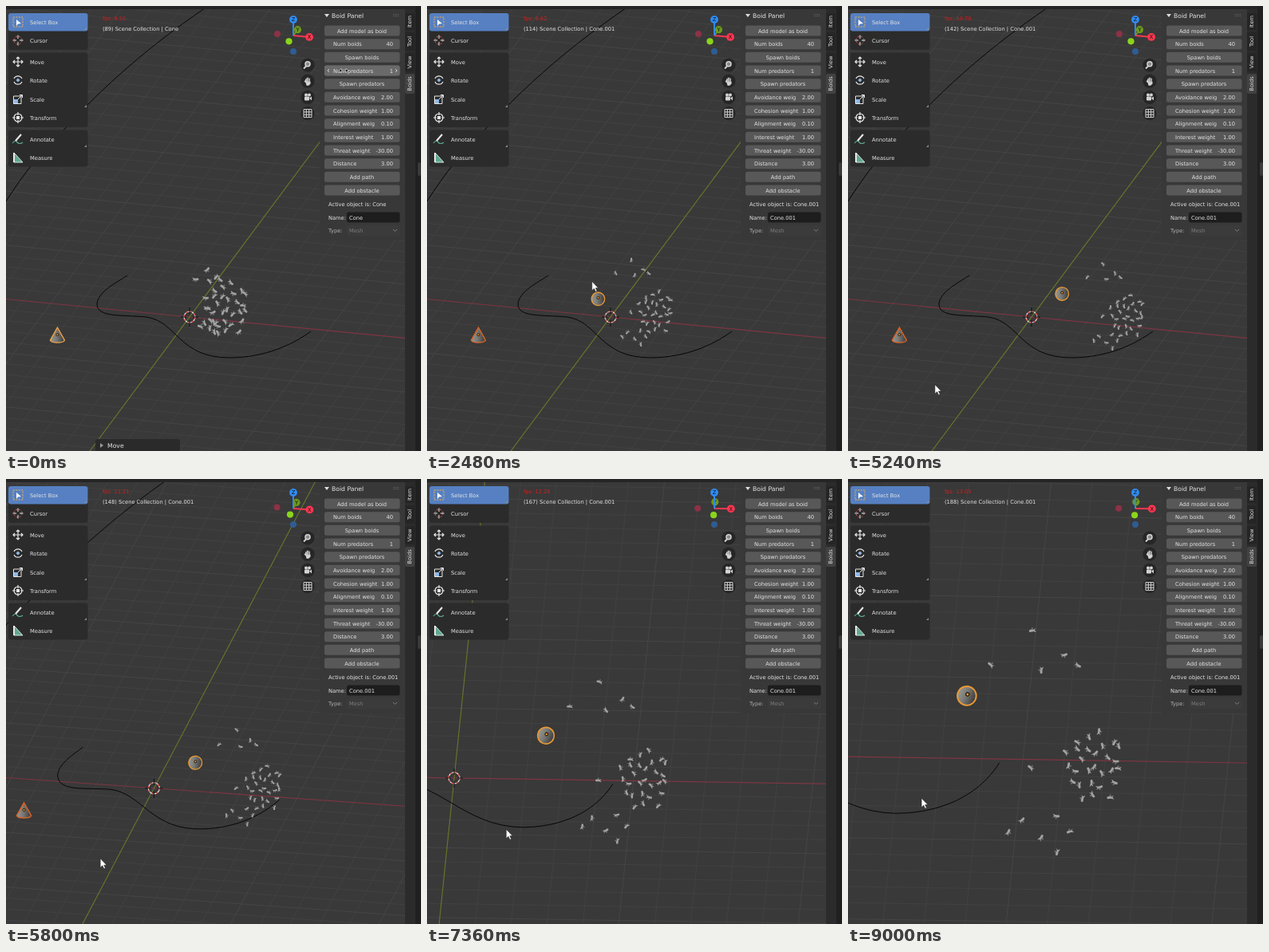
Animation, 520 px wide and 558 px high, one loop 9.04 s. Source, as an HTML page:

```html
<!DOCTYPE html>
<html>
<head>
<meta charset="utf-8">
<style>
html, body { margin: 0; width: 100%; height: 100%; overflow: hidden; background: #393939; }
svg { display: block; width: 520px; height: 558px; }
text { font-family: "DejaVu Sans", sans-serif; font-size: 6.7px; fill: #e4e4e4; }
.ground path { vector-effect: non-scaling-stroke; fill: none; }
</style>
</head>
<body>
<svg id="stage" viewBox="0 0 520 558"></svg>
<script>
const LOOP = 9040, SPAWN = 1400;
const stage = document.getElementById('stage');

function add(parent, tag, attrs = {}, content) {
  const node = document.createElementNS('http://www.w3.org/2000/svg', tag);
  set(node, attrs);
  if (content !== undefined) node.textContent = content;
  return parent.appendChild(node);
}
function set(node, attrs) {
  for (const key in attrs) node.setAttribute(key, attrs[key]);
}
const group = (parent, attrs) => add(parent, 'g', attrs);
const rect = (parent, x, y, width, height, fill, rx = 0) => add(parent, 'rect', { x, y, width, height, fill, rx });
const path = (parent, d, stroke, width = 1, fill = 'none') =>
  add(parent, 'path', { d, stroke, 'stroke-width': width, fill });
const shape = (parent, d, fill) => add(parent, 'path', { d, fill });
const disc = (parent, cx, cy, r, fill) => add(parent, 'circle', { cx, cy, r, fill });
const label = (parent, x, y, content, attrs = {}) => add(parent, 'text', { x, y, ...attrs }, content);
const show = (node, on) => node.setAttribute('display', on ? 'inline' : 'none');
const move = (node, x, y, rest = '') => node.setAttribute('transform', `translate(${x} ${y}) ${rest}`);
const ramp = (t, from, to) => Math.min(1, Math.max(0, (t - from) / (to - from)));

// Straight travel between a few timed stops
function sample(stops, t) {
  const i = Math.max(1, stops.findIndex(([time]) => time > t));
  const a = stops[i - 1], b = stops[i];
  const p = ramp(t, a[0], b[0]);
  return [1, 2].map(n => a[n] + (b[n] - a[n]) * p);
}
const POINTER = [
  [0, 423, 81], [500, 445, 97], [1400, 445, 97], [2480, 207, 345], [3000, 60, 515], [3800, 99, 481],
  [5400, 110, 474], [6480, 132, 479], [8120, 71, 405], [LOOP, 93, 400]
];
// time, frame count, frames per second
const COUNTER = [[0, 89, 9.5], [2480, 114, 9.62], [5240, 142, 10.7], [6480, 156, 11.83], [LOOP, 189.4, 13.07]];

// The camera first orbits, then zooms in, then pans
const phases = t => [ramp(t, 5480, 6480), ramp(t, 6480, 8120), ramp(t, 8120, 9000)];
function camera(t) {
  const [orbit, zoomIn, pan] = phases(t);
  const yaw = (15.1 - 12.8 * orbit) * Math.PI / 180;
  return {
    x: 230 - 139 * orbit - 106 * zoomIn - 23 * pan,
    y: 390 - 7 * orbit - 15 * zoomIn - 20.5 * pan,
    zoom: 1 + .04 * orbit + .39 * zoomIn,
    tilt: .363 + .02 * orbit + .012 * zoomIn,
    c: Math.cos(yaw), s: Math.sin(yaw)
  };
}
const groundMatrix = ({ x, y, zoom, tilt, c, s }) =>
  new DOMMatrix([zoom * c, zoom * tilt * s, zoom * s, -zoom * tilt * c, x, y]);
const wallMatrix = ({ x, y, zoom, tilt, c, s }) =>
  new DOMMatrix([zoom * c, zoom * tilt * s, 0, -.93 * zoom, x - 60 * zoom * s, y + 60 * zoom * tilt * c]);

// Ground, axes and paths
rect(stage, 0, 0, 520, 558, '#393939');
const ground = group(stage, { class: 'ground' });
let fine = '', bold = '';
for (let i = -45; i <= 45; i++) {
  const v = i * 36, lines = `M${v} -1800V1800M-1800 ${v}H1800`;
  if (i % 5) fine += lines; else if (i) bold += lines;
}
path(ground, fine, '#414141');
path(ground, bold, '#454545');
path(ground, 'M-1800 0H1800', '#7e3543', 1.1);
path(ground, 'M0 -1800V1800', '#69772b', 1.1);

const track = group(stage, { class: 'ground' });
path(track, 'M152 338C138 347 116 358 114 373C113 391 145 387 176 390C215 396 216 441 280 441C325 441 360 424 382 408', '#060606');
const arch = group(stage, { class: 'ground' });
path(arch, 'M-290 30C-268 80 -246 120 -222 156C-199 196 -175 230 -147 260C-95 325 -35 385 34 441L110 490', '#060606');

// 3D cursor
const ring = r => `M${r} 0A${r} ${r} 0 1 1 -${r} 0A${r} ${r} 0 1 1 ${r} 0`;
const origin = group(stage);
path(origin, ring(7), '#e8e8e8', 1.2);
set(path(origin, ring(7), '#e03434', 1.2), { 'stroke-dasharray': '2.75 2.75' });
path(origin, 'M-11 0H-4M4 0H11M0 -12V-4M0 4V12', '#111');

// Cones
const shade = add(add(stage, 'defs'), 'linearGradient', { id: 'shade' });
['#989894', '#777773', '#444444'].forEach((color, i) => add(shade, 'stop', { offset: i * .45, 'stop-color': color }));
const cone = group(stage);
const coneBody = path(cone, 'M0 -9L9 7Q8 10 0 10Q-8 10 -9 7Z', '#e8a24a', 1.4, 'url(#shade)');
const hunter = group(stage);
set(disc(hunter, 0, 0, 8.3, 'url(#shade)'), { stroke: '#ec9a33', 'stroke-width': 1.3 });
for (const [body, y] of [[cone, 0], [hunter, -1.5]]) {
  disc(body, 0, y, 1.9, '#2b1c10');
  disc(body, 0, y, 1, '#f0a030');
}

// Flock: a dense sunflower core, with a few stragglers fleeing above and below
const CORE = 28;
const STRAGGLERS = [
  [-71, -168], [-31, -137], [-14, -124], [-123, -125], [-60, -118],
  [-73, 4], [-84, 70], [-101, 85], [-60, 92], [-40, 110], [-24, 84], [-41, 65]
];
let seed = 7;
const random = () => (seed = seed * 16807 % 2147483647) / 2147483647;
const boids = [];
function addBoid(dx, dy, inCore) {
  const node = group(stage);
  shape(node, 'M-4.5 -2.4L-1 -1.4L3.5 -1.8L4 .4L1.2 1.4L-1.4 .8L-4 2.2L-2.6 0Z', '#a2a2a2');
  shape(node, 'M-1.4 .8L1.2 1.4L.4 3.6L-.8 3Z', '#6c6c6c');
  boids.push({ node, dx, dy, inCore, angle: random() * 360, turn: random() * 60 - 30 });
}
for (let i = 0; i < CORE; i++) {
  const r = Math.sqrt((i + .5) / CORE), a = i * 2.4;
  addBoid(5 + 40 * r * Math.cos(a) + random() * 8 - 4, 47 * r * Math.sin(a) + random() * 8 - 4, true);
}
STRAGGLERS.forEach(([dx, dy]) => addBoid(dx, dy, false));

// Window edges
rect(stage, 0, 0, 520, 4, '#252525');
rect(stage, 500, 4, 20, 554, '#2b2b2b');
rect(stage, 513, 0, 7, 558, '#202020');
rect(stage, 516, 196, 4, 17, '#3a3a3a', 2);
[['Item', 9, 21], ['Tool', 33, 23], ['View', 59, 23], ['Boids', 85, 25]].forEach(([name, y, h]) => {
  rect(stage, 500, y, 12, h, name == 'Boids' ? '#424242' : '#252525', 2);
  label(stage, 0, 0, name, { 'text-anchor': 'middle', transform: `translate(508 ${y + h / 2}) rotate(-90)` });
});

// Header text
const fpsText = label(stage, 121, 17.5, '', { style: 'fill:#d81c1c' });
const headText = label(stage, 121, 30.5, '');

// Toolbar
rect(stage, 3, 9, 99.5, 46, '#2b2b2b', 3);
rect(stage, 3, 58.5, 99.5, 93.5, '#2b2b2b', 3);
rect(stage, 3, 155.5, 99.5, 46, '#2b2b2b', 3);
rect(stage, 3, 9, 99.5, 22.5, '#5680c2', 3);
const INK = '#e8e8e8';
const TOOLS = [
  ['Select Box', 20, g => {
    set(path(g, 'M-6 -6H6V6H-6Z', '#f0b050'), { 'stroke-dasharray': '2 1.4' });
    shape(g, 'M-2 -3L4 2L0 2.5L-2 5Z', '#fff');
  }],
  ['Cursor', 43, g => {
    set(path(g, ring(5), '#e06060'), { 'stroke-dasharray': '2 2' });
    path(g, 'M-6.5 0H-2M2 0H6.5M0 -6.5V-2M0 2V6.5', INK);
  }],
  ['Move', 70, g => path(g, 'M-6 0H6M0 -6V6M-4 -2L-6 0L-4 2M4 -2L6 0L4 2M-2 -4L0 -6L2 -4M-2 4L0 6L2 4', INK, 1.2)],
  ['Rotate', 93, g => {
    path(g, 'M-5 -2A5.5 5.5 0 0 1 5 -2M5 2A5.5 5.5 0 0 1 -5 2', INK, 1.2);
    shape(g, 'M0 -2.5L2.5 0L0 2.5L-2.5 0Z', '#8fb8e8');
  }],
  ['Scale', 117, g => {
    path(g, 'M-5.5 -4H4V5.5H-5.5Z', INK);
    rect(g, -5, 0, 5, 5, '#8fb8e8');
    path(g, 'M0 0L5 -5M2 -5.5H5.5V-2', INK);
  }],
  ['Transform', 140, g => {
    path(g, ring(5) + 'M0 -7V-3M0 3V7M-7 0H-3M3 0H7', INK, 1.2);
    rect(g, -2, -2, 4, 4, INK);
  }],
  ['Annotate', 167, g => {
    path(g, 'M-7 5Q-3 0 -1 4Q2 7 6 4', '#5fb09a', 1.2);
    path(g, 'M-3 2L4 -6', INK, 2);
  }],
  ['Measure', 190, g => {
    path(g, 'M-5 -6L6 6H-5Z', '#d8e8e0', 1, '#5fa890');
    path(g, 'M-5 -6V6', INK, 2);
  }]
];
for (const [name, y, draw] of TOOLS) {
  label(stage, 30, y + 2.5, name);
  draw(group(stage, { transform: `translate(15 ${y})` }));
  if (['Select Box', 'Scale', 'Annotate'].includes(name)) shape(stage, `M101 ${y + 7}V${y + 10}H98Z`, '#8a8a8a');
}

// Axis gizmo
const gizmo = group(stage, { transform: 'translate(360 37)' });
const ball = (fill, r, name) => {
  const g = group(gizmo);
  disc(g, 0, 0, r, fill);
  if (name) label(g, 0, 2.4, name, { 'text-anchor': 'middle', style: 'fill:#111' });
  return g;
};
const negZ = ball('#2f5c92', 4), negX = ball('#8c3246', 4);
const lineY = path(gizmo, '', '#6d9a1c', 2), posY = ball('#6d9a1c', 4.6, 'Y');
const lineX = path(gizmo, '', '#f5384f', 2);
path(gizmo, 'M0 0V-20', '#2f8af0', 2);
const posX = ball('#ff3650', 4.9, 'X'), posZ = ball('#2f8cf5', 4.9, 'Z'), negY = ball('#8ad51c', 4.1);
move(posZ, 0, -20);
move(negZ, 0, 20);

// View buttons
const GLYPH = '#d4d4d4';
[
  g => { path(g, 'M-2 1.5L-5 4.5', GLYPH, 1.8); set(disc(g, 0, -1.2, 3, '#888'), { stroke: GLYPH, 'stroke-width': 1.5 }); },
  g => path(g, 'M-4 0L-2 2V-3M-.7 1V-4.5M.8 1V-4.5M2.3 1V-3.5M-2 1H3V3L1 5H-1Z', GLYPH, 1.1, GLYPH),
  g => { disc(g, -2, -3, 2, GLYPH); disc(g, 2, -3, 2, GLYPH); rect(g, -4, -1, 6, 5, GLYPH, 1); shape(g, 'M2 1L5 -1V4Z', GLYPH); },
  g => path(g, 'M-5 -5H5V5H-5ZM-1.7 -5V5M1.7 -5V5M-5 -1.7H5M-5 1.7H5', GLYPH)
].forEach((draw, i) => {
  const g = group(stage, { transform: `translate(378 ${74 + 20.2 * i})` });
  disc(g, 0, 0, 8.6, '#262626');
  draw(g);
});

// Side panel
rect(stage, 393, 4, 107, 290, '#383838');
shape(stage, 'M399 10H405L402 14Z', '#dddddd');
label(stage, 408, 14.5, 'Boid Panel', { style: 'font-size:7.7px' });
set(path(stage, 'M485 10.5H493M485 12.5H493', '#666'), { 'stroke-dasharray': '1 1' });
const hover = group(stage);
[
  ['Add model as boid'], ['Num boids', '40'], ['Spawn boids'], ['Num predators', '1'], ['Spawn predators'],
  ['Avoidance weig', '2.00'], ['Cohesion weight', '1.00'], ['Alignment weig', '0.10'], ['Interest weight', '1.00'],
  ['Threat weight', '-30.00'], ['Distance', '3.00'], ['Add path'], ['Add obstacle']
].forEach(([name, value], i) => {
  const y = 31 + i * 16.67;
  rect(stage, 399, y - 6.5, 94.5, 13, '#585858', 2.5);
  if (name == 'Num predators') {
    stage.append(hover);
    rect(hover, 399, y - 6.5, 94.5, 13, '#6a6a6a', 2.5);
    path(hover, `M405 ${y - 2}L403 ${y}L405 ${y + 2}M488 ${y - 2}L490 ${y}L488 ${y + 2}`, INK, .8);
  }
  if (value) {
    label(stage, 410, y + 2.5, name);
    label(stage, 485, y + 2.5, value, { 'text-anchor': 'end' });
  } else label(stage, 446, y + 2.5, name, { 'text-anchor': 'middle' });
});
const activeText = label(stage, 404, 250.5, '');
label(stage, 404, 267.5, 'Name:');
rect(stage, 427, 258.5, 66.5, 13, '#1d1d1d', 2.5);
const nameText = label(stage, 430, 267.5, '');
label(stage, 404, 284, 'Type:', { style: 'fill:#b0b0b0' });
rect(stage, 427, 275, 66.5, 13, '#3b3b3b', 2.5);
label(stage, 430, 284, 'Mesh', { style: 'fill:#7c7c7c' });
path(stage, 'M485 280L487.5 282.5L490 280', '#7c7c7c');

// Operator box and mouse pointers
const operator = group(stage);
rect(operator, 112, 543, 106, 18, '#2a2a2a', 3);
shape(operator, 'M118 548L122 551L118 554Z', '#999');
label(operator, 127, 553.8, 'Move', { style: 'font-size:7.7px' });
const arrow = group(stage);
path(arrow, 'M0 0V11.5L2.7 9L4.6 13L6.4 12.2L4.6 8.3H8Z', '#222', .6, '#fff');
const resize = group(stage);
path(resize, 'M-6 0L-3 -2.5V-.8H3V-2.5L6 0L3 2.5V.8H-3V2.5Z', '#fff', .6, '#111');

const startView = groundMatrix(camera(0)).inverse();

function renderScene(t) {
  const cam = camera(t), view = groundMatrix(cam);
  set(ground, { transform: view });
  set(track, { transform: view.multiply(startView) });
  set(arch, { transform: wallMatrix(cam) });
  move(origin, cam.x, cam.y);
  const base = view.transformPoint(new DOMPoint(-144, -102));
  move(cone, base.x, base.y, `scale(${cam.zoom})`);
  set(coneBody, { stroke: t < SPAWN ? '#e8a24a' : '#dc6426' });

  const X = [20.8 * cam.c, 20.8 * cam.s * cam.tilt], Y = [21 * cam.s, -21 * cam.c * cam.tilt];
  move(posX, ...X);
  move(negX, -X[0], -X[1]);
  move(posY, ...Y);
  move(negY, -Y[0], -Y[1]);
  set(lineX, { d: `M0 0L${X}` });
  set(lineY, { d: `M0 0L${Y}` });
  return cam.zoom;
}

function renderFlock(t, zoom) {
  const [orbit, zoomIn, pan] = phases(t);
  const gather = 1 - ramp(t, 0, 2480), flee = ramp(t, 2480, 5480), drift = Math.min(t, 5480) / 1000;
  const x = 272 + 11 * (1 - gather) + 69 * flee - 102 * orbit + 32 * zoomIn + 20 * pan;
  const y = 378 + 1.8 * drift - 6 * orbit - 13 * zoomIn - 11 * pan;
  const core = .6 + .15 * gather + .1 * orbit + .27 * zoomIn + .03 * pan;
  const outer = .38 - .1 * gather + .14 * orbit + .37 * zoomIn + .11 * pan;
  const size = .75 * zoom + .25 * gather;
  for (const b of boids) {
    const k = b.inCore ? core : outer;
    move(b.node, x + b.dx * k, y + b.dy * k, `rotate(${b.angle + b.turn * t / 1000}) scale(${size})`);
  }
  show(hunter, t >= SPAWN);
  move(hunter, 166 + 19.5 * drift - 111 * orbit - 24 * zoomIn + 11 * pan,
    373 - 2.3 * drift - 14.5 * orbit - 45 * zoomIn - 29 * pan, `scale(${zoom}) rotate(${25 * orbit})`);
}

function renderInterface(t) {
  const spawned = t >= SPAWN, onField = t < 300;
  const name = spawned ? 'Cone.001' : 'Cone';
  const [count, fps] = sample(COUNTER, t);
  fpsText.textContent = 'fps: ' + fps.toFixed(2);
  headText.textContent = `(${Math.floor(count + 1e-6)}) Scene Collection | ${name}`;
  activeText.textContent = 'Active object is: ' + name;
  nameText.textContent = name;
  show(operator, !spawned);
  show(hover, onField);
  show(resize, onField);
  show(arrow, !onField);
  const tip = sample(POINTER, t);
  move(resize, ...tip);
  move(arrow, ...tip);
}

const began = performance.now();
function tick() {
  const t = (performance.now() - began) % LOOP;
  renderFlock(t, renderScene(t));
  renderInterface(t);
  requestAnimationFrame(tick);
}
tick();
</script>
</body>
</html>
```
